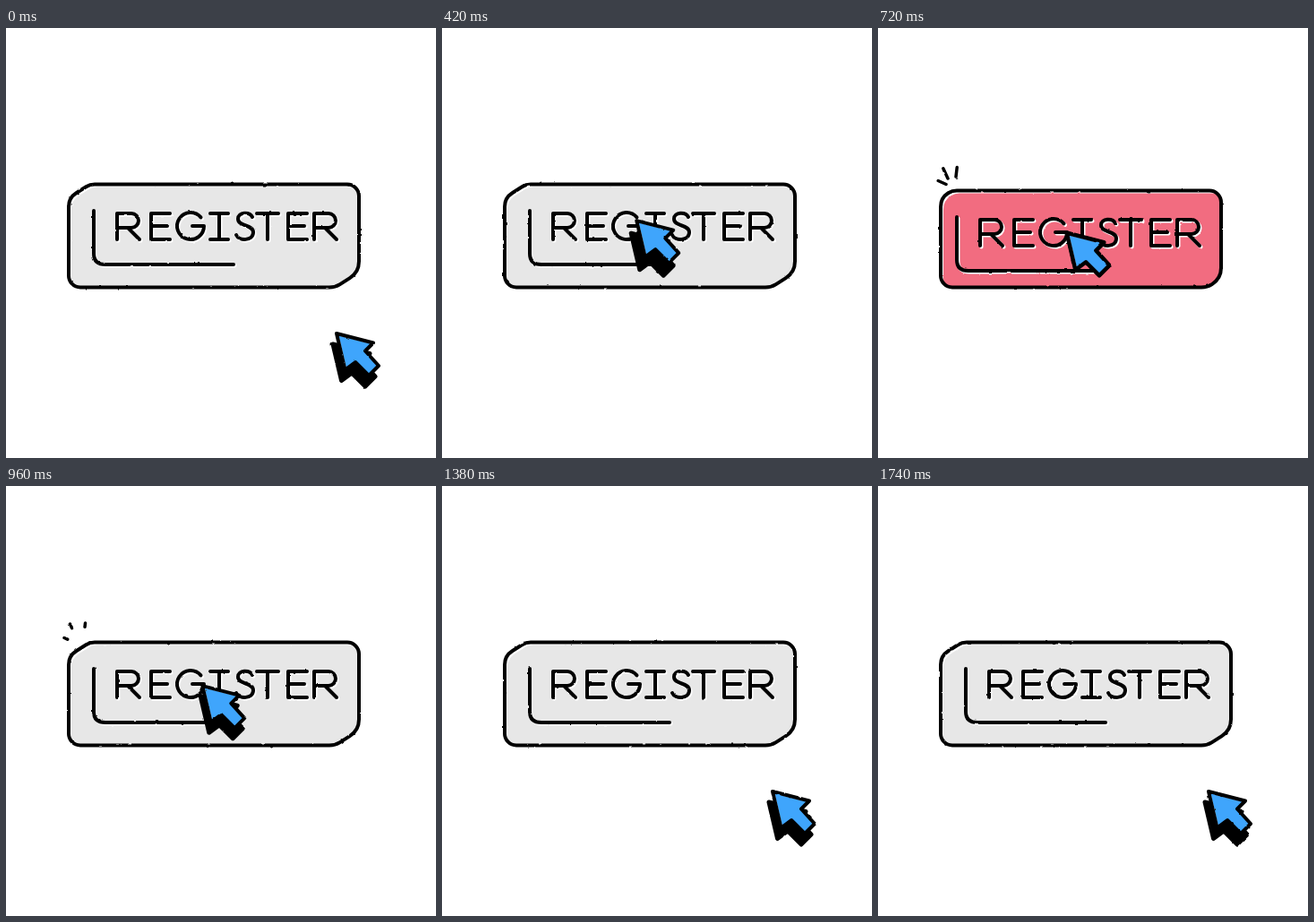
An HTML page that plays this animation: 480x480 px, repeating every 1800 ms.

```html
<!DOCTYPE html>
<html lang="en">
<head>
<meta charset="utf-8">
<title>Register</title>
<style>
  html, body { margin: 0; width: 100%; height: 100%; overflow: hidden; background: #fff; }
  svg { display: block; width: 100vw; height: 100vh; }
  .ink { fill: none; stroke: #000; stroke-width: 4; stroke-linecap: round; stroke-linejoin: round; }
  .light { stroke: #fff; }
</style>
</head>
<body>
<svg viewBox="0 0 480 480" role="img" aria-label="REGISTER">
  <defs>
    <filter id="rough" filterUnits="userSpaceOnUse" x="0" y="0" width="480" height="480" color-interpolation-filters="sRGB">
      <feTurbulence id="noise" type="fractalNoise" baseFrequency=".14" numOctaves="2"/>
      <feDisplacementMap in="SourceGraphic" scale="2" xChannelSelector="R" yChannelSelector="G"/>
    </filter>
    <path id="box"/>
    <path id="arrow" d="M1 1L42 11.5L33 20.5L48 37L37 48L22 33L10.5 41.5Z"/>
    <g id="label">
      <path d="M98 204V252Q98 264 111 264H254"/>
      <path id="R" d="M124 236V207H140a8 8 0 0 1 0 16H125M136 223L149 236"/>
      <path id="E" d="M183 207H162V236H183M162 221H180"/>
      <path d="M217.5 211.4A15 15 0 1 0 221 221H208"/>
      <path d="M228 207H248M238 207V236M228 236H248"/>
      <path d="M275 211C272 205 259 205 259 213C259 222 276 219 276 228C276 238 260 238 257 231"/>
      <path d="M280 207H304M292 207V236"/>
      <use href="#E" x="153"/>
      <use href="#R" x="220"/>
    </g>
    <clipPath id="boxClip"><use href="#box"/></clipPath>
    <clipPath id="arrowClip"><use href="#arrow"/></clipPath>
  </defs>
  <g filter="url(#rough)">
    <g clip-path="url(#boxClip)"><use id="fill" href="#box" x="3" y="3"/></g>
    <use href="#box" class="ink"/>
    <g id="face">
      <use href="#label" class="ink light" x="1.5" y="1.5"/>
      <use href="#label" class="ink"/>
    </g>
    <path id="ticks" class="ink" style="stroke-width:3.5"/>
    <use id="shadow" href="#arrow" class="ink" style="fill:#000;stroke-width:5"/>
    <g id="cursor">
      <use href="#arrow" fill="#fff"/>
      <g clip-path="url(#arrowClip)"><use href="#arrow" x="2.5" y="2.5" fill="#3fa5fc"/></g>
      <use href="#arrow" class="ink"/>
    </g>
  </g>
</svg>
<script>
const LOOP = 1800, STEP = 60;
const $ = id => document.getElementById(id);
const mix = (a, b, p) => a + (b - a) * p;
const clamp = v => Math.max(0, Math.min(1, v));
const ease = p => .5 - .5 * Math.cos(Math.PI * p);

// time, shadow x, y, cursor lift x, y, button height, hop on the way here
const keys = [
  [0, 364, 352, 4, -12, 1, 0],
  [430, 210, 228, 6, -14, 1, 1],
  [470, 210, 228, 6, -14, 1, 0],
  [600, 210, 228, 0, 0, 0, 0],
  [780, 210, 228, 0, 0, 0, 0],
  [900, 216, 233.5, 2, -11.5, 1, 0],
  [950, 216, 233.5, 2, -11.5, 1, 0],
  [1370, 364, 352, 4, -12, 1, 1],
  [LOOP, 364, 352, 4, -12, 1, 0]
];

// inner end, outer end
const ticks = [[76, 174.5, 65, 169.5], [78, 168, 71.5, 154], [87, 166, 88.5, 153]];

function pose(t) {
  const i = keys.findIndex(k => k[0] > t), a = keys[i - 1], b = keys[i];
  const p = ease((t - a[0]) / (b[0] - a[0]));
  const [, x, y, liftX, liftY, height] = a.map((v, n) => mix(v, b[n], p));
  const hop = b[6] * Math.sin(Math.PI * p);
  return { x, y, height, liftX: liftX + 12.5 * hop, liftY: liftY - 13 * hop };
}

// Outline of a rounded plate raised up and to the right
function boxPath(height) {
  const left = 70, top = 181.5, right = 383, bottom = 289.5;
  const x = 11 * height, y = -7 * height;
  const small = 13, first = 18, last = 22;  // corner radii
  const cut = r => [r * (1 - .537), r * (1 - .844)];  // where the slanted edge meets a corner
  const [fx, fy] = cut(first), [lx, ly] = cut(last);
  const arc = (r, px, py) => `A${r} ${r} 0 0 1 ${px} ${py}`;
  return `M${left} ${top + first}` + arc(first, left + fx, top + fy) +
    `L${left + fx + x} ${top + fy + y}` + arc(first, left + first + x, top + y) +
    `H${right - small + x}` + arc(small, right + x, top + small + y) +
    `V${bottom - last + y}` + arc(last, right - lx + x, bottom - ly + y) +
    `L${right - lx} ${bottom - ly}` + arc(last, right - last, bottom) +
    `H${left + small}` + arc(small, left, bottom - small) + 'Z';
}

function tickPath(t) {
  const head = clamp((t - 600) / 150), tail = clamp((t - 720) / 360);
  if (head <= tail) return '';
  return ticks.map(([x1, y1, x2, y2]) =>
    `M${mix(x1, x2, tail)} ${mix(y1, y2, tail)}L${mix(x1, x2, head)} ${mix(y1, y2, head)}`).join('');
}

const move = (id, x, y) => $(id).setAttribute('transform', `translate(${x} ${y})`);

function draw(t) {
  const { x, y, liftX, liftY, height } = pose(t);
  $('noise').setAttribute('seed', 1 + t / STEP);
  $('box').setAttribute('d', boxPath(height));
  $('fill').setAttribute('fill', height < .05 ? '#f26c80' : '#e7e7e7');
  $('ticks').setAttribute('d', tickPath(t));
  move('face', 10 * (height - 1), 7 * (1 - height));
  move('shadow', x, y);
  move('cursor', x + liftX, y + liftY);
}

let start;
function tick(now) {
  start ??= now;
  draw(Math.floor((now - start) % LOOP / STEP) * STEP);
  requestAnimationFrame(tick);
}
draw(0);
requestAnimationFrame(tick);
</script>
</body>
</html>
```
